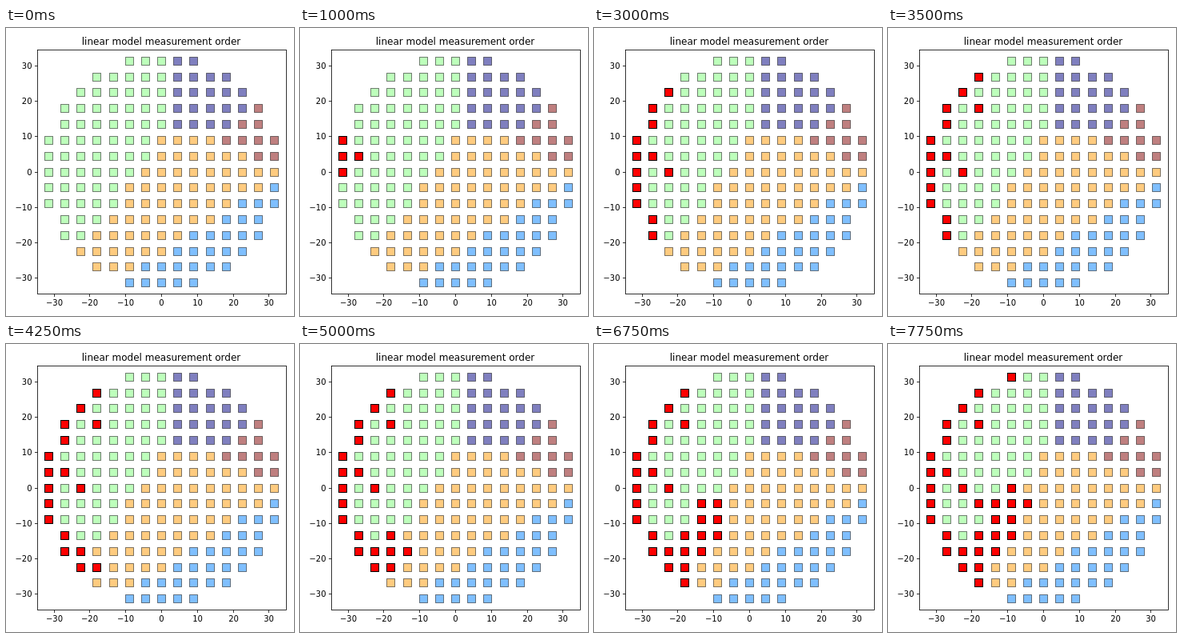
Recreate the animation shown at these times as an HTML page. Size 360x360 px, loop 8000 ms.

```html
<!DOCTYPE html>
<html lang="en">
<head>
<meta charset="utf-8">
<title>linear model measurement order</title>
<style>
  html, body { margin: 0; width: 100%; height: 100%; overflow: hidden; background: #fff; }
  svg { display: block; width: 360px; height: 360px; }
  text { font: 10px "DejaVu Sans", sans-serif; }
  .title { font-size: 12px; }
  .mid { text-anchor: middle; }
  .end { text-anchor: end; }
  .axis { fill: none; stroke: #000; stroke-width: .8; }
  .die { stroke: #000; stroke-opacity: .5; fill-opacity: .5; }
  .die.done { fill: #f00; stroke-opacity: 1; fill-opacity: 1; }
  .g { fill: #7cff79; }
  .p { fill: #000080; }
  .r { fill: #800000; }
  .o { fill: #ff9700; }
  .b { fill: #0080ff; }
</style>
</head>
<body>
<svg viewBox="0 0 360 360">
  <text class="title mid" x="194" y="21">linear model measurement order</text>
  <g id="dies"></g>
  <rect class="axis" x="39.5" y="27.5" width="311" height="305"/>
  <g id="ticks"></g>
</svg>
<script>
const STEP = 250, LOOP = 8000;

// One row of the wafer per string, coloured by group
const wafer = [
  '     gggpp',
  '   gggggpppp',
  '  ggggggppppp',
  ' gggggggpppppr',
  ' gggggggpppprr',
  'gggggggoooorrrr',
  'gggggggoooooorr',
  'ggggggooooooooo',
  'gggggooooooooob',
  'gggggooooooobbb',
  ' gggooooooobbb',
  ' ggoooooobbbbb',
  '  oooooobbbbb',
  '   ooobbbbbb',
  '     bbbbb'
];

// Visiting order as column,row
const order = ('0,5 0,6 1,6 0,7 0,8 0,9 1,4 1,3 1,10 2,7 1,11 2,2 3,1 3,3 2,12 2,11 ' +
  '3,12 3,11 4,11 3,10 3,13 4,10 5,10 4,9 5,9 5,8 4,8 3,8 5,7 5,0 6,8').split(' ');

const snap = v => Math.floor(v) + .5;
const xPos = v => snap(194.52 + 4.482 * v);
const yPos = v => snap(180 - 4.402 * v);

function add(parent, tag, attrs, text = '') {
  const el = document.createElementNS('http://www.w3.org/2000/svg', tag);
  for (const key in attrs) el.setAttribute(key, attrs[key]);
  el.textContent = text;
  return parent.appendChild(el);
}

const dieLayer = document.getElementById('dies');
const dies = {};
wafer.forEach((line, row) => [...line].forEach((group, col) => {
  if (group === ' ') return;
  dies[col + ',' + row] = add(dieLayer, 'rect', {
    class: 'die ' + group,
    x: snap(194.52 + 20.17 * (col - 7)) - 5,
    y: snap(180 + 19.81 * (row - 7)) - 5,
    width: 10, height: 10
  });
}));

const tickLayer = document.getElementById('ticks');
for (let v = -30; v <= 30; v += 10) {
  const x = xPos(v), y = yPos(v);
  const label = String(v).replace('-', '\u2212');
  add(tickLayer, 'path', { class: 'axis', d: `M${x} 332.5v3.5M39.5 ${y}h-3.5` });
  add(tickLayer, 'text', { class: 'mid', x, y: 346.5 }, label);
  add(tickLayer, 'text', { class: 'end', x: 32.5, y: y + 3.5 }, label);
}

function draw() {
  const count = Math.floor(performance.now() % LOOP / STEP);
  order.forEach((key, i) => dies[key].classList.toggle('done', i < count));
  requestAnimationFrame(draw);
}
draw();
</script>
</body>
</html>
```
